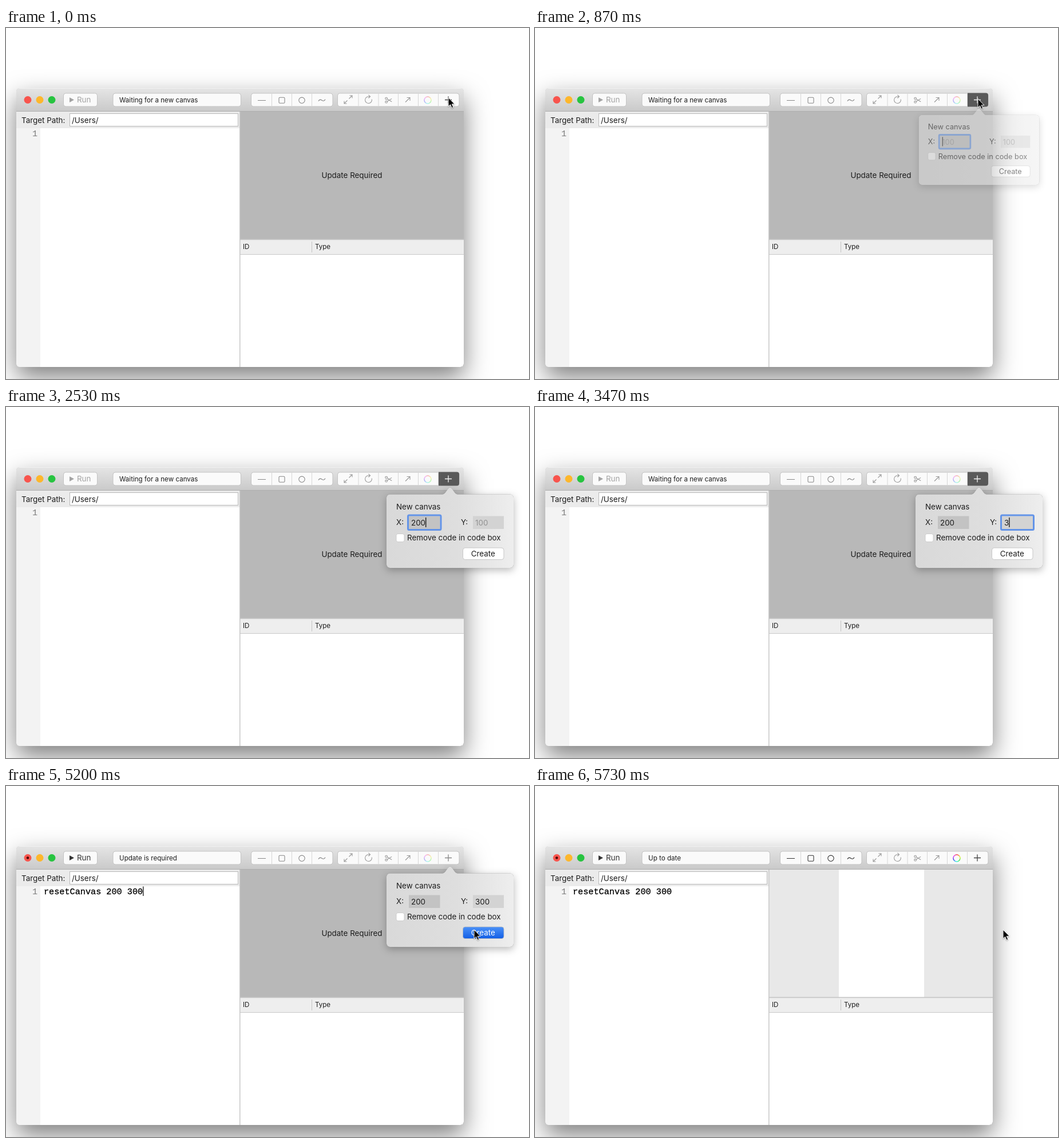
Write an HTML page that moves like this. It is 914 px wide and 613 px high and loops after 5990 ms.

```html
<!DOCTYPE html>
<html lang="en">
<head>
<meta charset="utf-8">
<title>New canvas</title>
<style>
  html, body { margin: 0; width: 100%; height: 100%; overflow: hidden; background: #fff; }
  svg { display: block; font: 13.4px Inter, sans-serif; fill: #1c1c1c; }
  .small { font-size: 11.6px; }
  .code { font: 15.2px "Liberation Mono", monospace; }
  .btn { fill: #fafafa; stroke: #c3c3c3; }
  .split { stroke: #d6d6d6; }
  .icon { fill: none; stroke: #999; stroke-width: 1.1; }
  .caret { fill: #111; }
  .ring { fill: none; stroke: #6394e8; stroke-width: 3; }
  #window { filter: drop-shadow(0 0 .6px rgba(0,0,0,.5)) drop-shadow(0 18px 22px rgba(0,0,0,.5)); }
  #bubble { filter: drop-shadow(0 0 .6px rgba(0,0,0,.45)) drop-shadow(0 4px 7px rgba(0,0,0,.28)); }
  #cursor { filter: drop-shadow(0 1px 1px rgba(0,0,0,.35)); }
</style>
</head>
<body>
<svg width="914" height="613" viewBox="0 0 914 613">
  <defs>
    <linearGradient id="bar" x2="0" y2="1"><stop stop-color="#e5e5e5"/><stop offset="1" stop-color="#c9c9c9"/></linearGradient>
    <linearGradient id="glass"><stop stop-color="#d9d9d9"/><stop offset=".55" stop-color="#dedede"/><stop offset="1" stop-color="#eee"/></linearGradient>
    <linearGradient id="blue" x2="0" y2="1"><stop stop-color="#4b91f7"/><stop offset="1" stop-color="#135fe6"/></linearGradient>
    <clipPath id="frame"><rect x="18" y="105" width="782" height="487" rx="6"/></clipPath>
  </defs>

  <rect id="window" x="18" y="105" width="782" height="487" rx="6" fill="#fff"/>
  <g clip-path="url(#frame)">
    <rect x="18" y="105" width="782" height="41" fill="url(#bar)"/>
    <rect x="18" y="105" width="782" height="1" fill="#f1f1f1"/>
    <rect x="18" y="145" width="782" height="1" fill="#aeaeae"/>
    <rect x="18" y="146" width="391" height="29" fill="#ebebeb"/>
    <rect x="18" y="175" width="42" height="417" fill="#f3f3f3"/>
    <rect id="preview" x="409" y="146" width="391" height="223"/>
    <rect id="page" x="531" y="146" width="149" height="223" fill="#fff"/>
    <rect x="409" y="368.5" width="391" height="2" fill="#c6c6c6"/>
    <rect x="409" y="370.5" width="391" height="25" fill="#eee"/>
    <rect x="409" y="395" width="391" height="1" fill="#c9c9c9"/>
    <rect x="534" y="373" width="1" height="19" fill="#c4c4c4"/>
    <rect x="408" y="146" width="1.5" height="446" fill="#c8c8c8"/>
  </g>

  <circle cx="38" cy="125.5" r="6.5" fill="#f8544d"/>
  <circle id="edited" cx="38" cy="125.5" r="2.3" fill="#4d0503"/>
  <circle cx="59" cy="125.5" r="6.5" fill="#fdb72c"/>
  <circle cx="80" cy="125.5" r="6.5" fill="#27c440"/>

  <rect class="btn" x="100.5" y="114" width="59" height="23" rx="4"/>
  <g id="run"><path d="M111 121.2v8.8l8-4.4z"/><text x="124" y="130.4">Run</text></g>
  <rect class="btn" x="187" y="114" width="223.5" height="23" rx="4"/>
  <text id="status" class="small" x="198" y="130"></text>

  <rect class="btn" x="428.5" y="114" width="142.5" height="23" rx="4"/>
  <rect class="btn" x="579.5" y="114" width="212.5" height="23" rx="4"/>
  <path class="split" d="M464.5 114.5v22M499.5 114.5v22M534.5 114.5v22M616 114.5v22M651 114.5v22M685.5 114.5v22M720.5 114.5v22M755.5 114.5v22"/>
  <path id="plusOn" d="M756 113.5h32a4 4 0 0 1 4 4v16a4 4 0 0 1-4 4h-32z" fill="#595959"/>
  <g id="shapes" class="icon">
    <path d="M440 126.5h14M546 127.6c2-3.4 4-2.8 6-1.4s4 1.8 6-1.6"/>
    <rect x="477" y="121.3" width="10" height="10" rx="1.6"/>
    <circle cx="517" cy="126.3" r="5.2"/>
  </g>
  <g class="icon">
    <path d="M599.5 123.5l5.5-5.5m-4.5 0h4.5v4.5M596.5 126.5l-5.5 5.5m0-4.5v4.5h4.5"/>
    <path d="M639.3 124.5a5.9 5.9 0 1 1-5.8-4.8h2.4M633.5 116.9l3 2.8-3 2.8"/>
    <circle cx="664.6" cy="123" r="1.8"/><circle cx="664.6" cy="129.2" r="1.8"/>
    <path d="M666.2 124l8 4.8M666.2 128.2l8-4.8"/>
    <path d="M698 129.5l8-8m-5.5 0h5.5v5.5"/>
  </g>
  <g id="wheel" fill="none" stroke-width="1.5"></g>
  <path id="plus" d="M767 125.5h12M773 119.5v12" fill="none" stroke-width="1.3"/>

  <text x="27" y="165.5">Target Path:</text>
  <rect x="111.5" y="149.5" width="294" height="22" fill="#fff" stroke="#b9b9b9"/>
  <text x="115" y="165.5">/Users/</text>
  <text class="code" x="46" y="189" fill="#7b7b7b">1</text>
  <text id="code" class="code" x="66" y="189" fill="#000" stroke="#000" stroke-width=".3">resetCanvas 200 300</text>
  <rect id="codeCaret" class="caret" y="175.5" width="1.3" height="16.5"/>
  <text id="notice" x="604.5" y="262" text-anchor="middle">Update Required</text>
  <text class="small" x="414" y="386">ID</text>
  <text class="small" x="540" y="386">Type</text>

  <g id="popover">
    <path id="bubble" fill="url(#glass)" d="M671 152.5h92c5 0 9-12 13-12s8 12 13 12h92a6 6 0 0 1 6 6v116.500a6 6 0 0 1-6 6H671a6 6 0 0 1-6-6V158.500a6 6 0 0 1 6-6z"/>
    <text x="682" y="179.300">New canvas</text>
    <text x="682" y="206">X:</text>
    <text x="795" y="206">Y:</text>
    <rect x="704" y="190.500" width="54.500" height="22.500" fill="#c3c3c3"/>
    <rect x="816" y="190.500" width="54" height="22.500" fill="#d3d3d3"/>
    <rect id="xRing" class="ring" x="702.500" y="189" width="57.500" height="25.500" rx="2"/>
    <rect id="yRing" class="ring" rx="2"/>
    <text id="xText" x="708" y="207"></text>
    <text id="yText" x="820" y="207"></text>
    <rect id="xCaret" class="caret" y="193" width="1.3" height="17"/>
    <rect id="yCaret" class="caret" y="193" width="1.3" height="17"/>
    <rect x="682" y="221.500" width="14" height="14" rx="3" fill="#fff" stroke="#c4c4c4" stroke-width=".8"/>
    <text x="701" y="233.300">Remove code in code box</text>
    <rect id="create" x="798.500" y="246" width="71.500" height="20.500" rx="4" stroke="#bcbcbc" stroke-width=".8"/>
    <text id="createText" x="833.700" y="261" text-anchor="middle">Create</text>
  </g>

  <path id="cursor" d="M0 0v15.500l3.600-3.300 2.500 5.800 2.600-1.100-2.500-5.600h4.900z" fill="#000" stroke="#fff" stroke-width="1"/>
</svg>
<script>
const LOOP = 5990, STEP = 1000 / 15;
const ui = Object.fromEntries([...document.querySelectorAll('[id]')].map(el => [el.id, el]));

const clamp = v => Math.max(0, Math.min(1, v));
const progress = (t, from, to) => clamp((t - from) / (to - from));
const smooth = p => p * p * (3 - 2 * p);
const between = (t, from, to) => t >= from && t < to;
const show = (el, on) => el.style.display = on ? '' : 'none';
const set = (el, attrs) => { for (const k in attrs) el.setAttribute(k, attrs[k]); };

// Rainbow ring made of short arcs
for (let i = 0; i < 24; i++) {
  const point = k => {
    const a = k * Math.PI / 12;
    return `${737 + 6 * Math.cos(a)} ${126 + 6 * Math.sin(a)}`;
  };
  const arc = document.createElementNS('http://www.w3.org/2000/svg', 'path');
  set(arc, { d: `M${point(i)}L${point(i + 1.1)}`, stroke: `hsl(${i * 15 + 90} 85% 60%)` });
  ui.wheel.append(arc);
}

function field(t, text, caret, value, keyTimes, caretOn) {
  const count = keyTimes.filter(k => t >= k).length;
  text.textContent = count ? value.slice(0, count) : '100';
  text.setAttribute('fill', count ? '#1c1c1c' : '#929292');
  const left = +text.getAttribute('x');
  caret.setAttribute('x', left + (count ? text.getComputedTextLength() : 0.3));
  show(caret, caretOn);
}

function draw(t) {
  const written = t >= 5200, updated = t >= 5330;
  const plusOn = between(t, 330, 5200);

  // Toolbar and panes
  show(ui.edited, written);
  ui.run.setAttribute('fill', written ? '#333' : '#a3a3a3');
  ui.status.textContent = updated ? 'Up to date' : written ? 'Update is required' : 'Waiting for a new canvas';
  ui.shapes.style.stroke = updated ? '#333' : '#888';
  ui.wheel.setAttribute('opacity', updated ? 1 : 0.4);
  show(ui.plusOn, plusOn);
  ui.plus.setAttribute('stroke', plusOn ? '#f4f4f4' : written && !updated ? '#888' : '#444');
  ui.preview.setAttribute('fill', updated ? '#e8e8e8' : '#b8b8b8');
  show(ui.page, updated);
  show(ui.notice, !updated);

  // Editor
  show(ui.code, written);
  show(ui.codeCaret, between(t, 130, 670) || between(t, 5200, 5730));
  ui.codeCaret.setAttribute('x', written ? 66 + ui.code.getComputedTextLength() : 65.5);

  // Popover
  const opening = progress(t, 733, 1000), closing = progress(t, 5210, 5470);
  const scale = 0.895 + 0.105 * opening;
  show(ui.popover, opening > 0 && closing < 1);
  ui.popover.setAttribute('opacity', opening * (1 - closing));
  ui.popover.setAttribute('transform', `translate(776 140) scale(${scale}) translate(-776 -140)`);
  field(t, ui.xText, ui.xCaret, '200', [2200, 2330, 2530], between(t, 730, 1730) || between(t, 2200, 3130));
  field(t, ui.yText, ui.yCaret, '300', [3400, 3800, 3930], between(t, 3130, 4470));
  show(ui.xRing, t < 3130);
  show(ui.yRing, between(t, 3270, 5200));
  const ring = progress(t, 3200, 3400), grow = 10 * (1 - ring);
  set(ui.yRing, {
    x: 814.5 - grow, y: 189 - grow, width: 57 + 2 * grow, height: 25.5 + 2 * grow, opacity: ring
  });
  const pressed = t >= 5070;
  ui.create.setAttribute('fill', pressed ? 'url(#blue)' : '#fff');
  ui.createText.setAttribute('fill', pressed ? '#fff' : '#1c1c1c');

  // Pointer
  const settle = progress(t, 0, 130), travel = smooth(progress(t, 4270, 4930));
  const x = 773 + settle + 44 * travel, y = 121.5 + 2 * settle + 127.5 * travel;
  show(ui.cursor, !between(t, 2200, 4330));
  ui.cursor.setAttribute('transform', `translate(${x} ${y})`);
}

function tick() {
  const now = performance.now() % LOOP;
  draw(Math.floor((now + 4) / STEP) * STEP + 5);
  requestAnimationFrame(tick);
}
tick();
</script>
</body>
</html>
```
